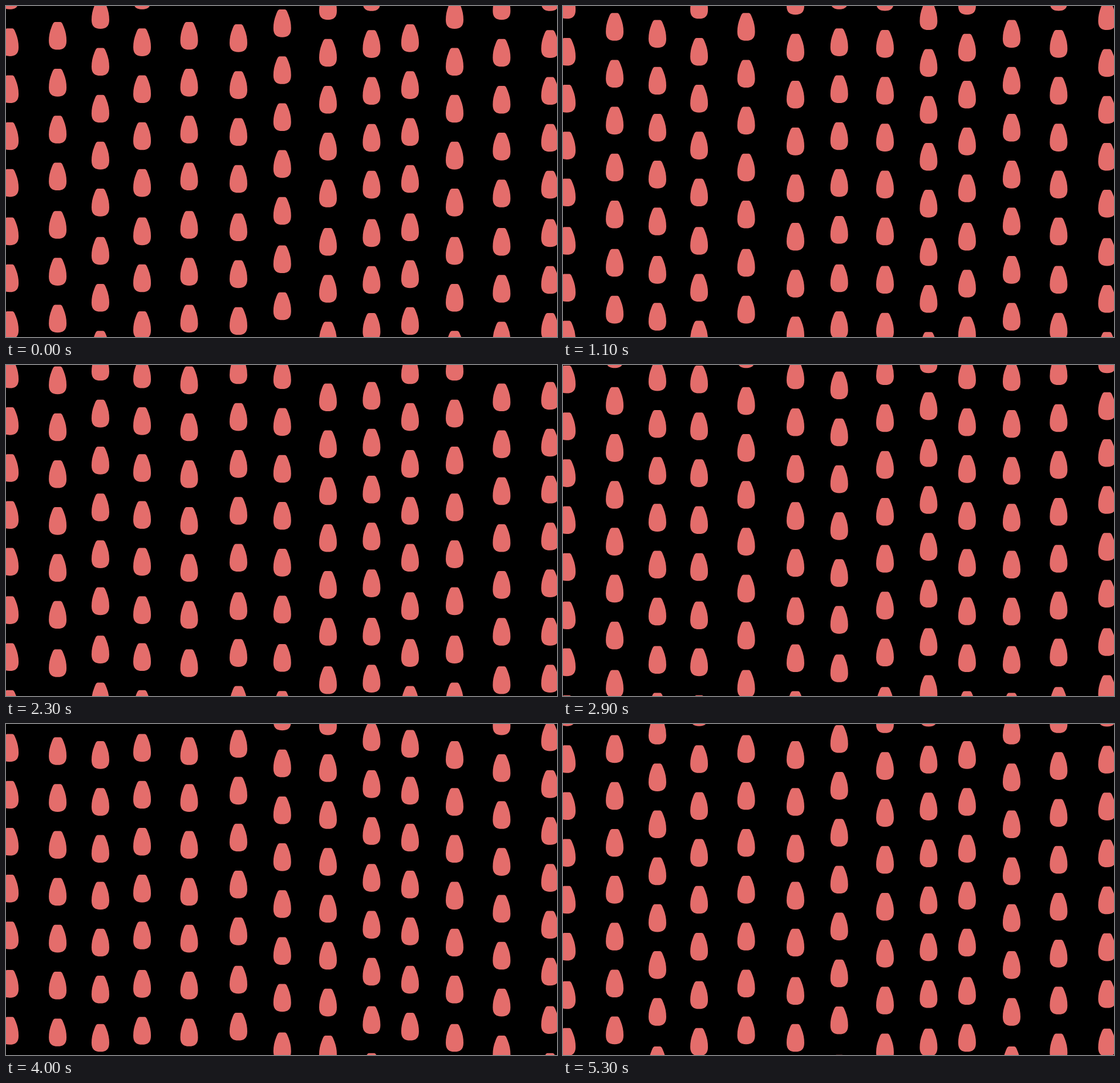
These frames come from a looping animation (966 px wide and 580 px high, 5.4 s). An HTML page with a canvas:

```html
<!DOCTYPE html>
<html lang="en">
<head>
<meta charset="utf-8">
<title>Falling drops</title>
<style>
  html, body { margin: 0; height: 100%; overflow: hidden; background: #000; }
  canvas { display: block; }
</style>
</head>
<body>
<canvas id="stage" width="966" height="580"></canvas>
<script>
const LOOP = 5400, STEP = 100;
const SPACING = 82.17, SEAM = 2.6; // each strip has one slightly wider gap
const SLOW = 1.511, MEDIUM = 2 * SLOW, FAST = 4 * SLOW; // px per step

// Strips share a speed and the height of their seam; each hangs at a few x.
const strips = [
  { speed: SLOW, seam: 370.6, at: [6.6, 238.6] },
  { speed: SLOW, seam: 363.4, at: [407.5, 708.4] },
  { speed: MEDIUM, seam: 404.8, at: [165.5, 786.5] },
  { speed: MEDIUM, seam: 419.5, at: [484.3] },
  { speed: MEDIUM, seam: 373.6, at: [640.9, 953.8] },
  { speed: FAST, seam: 359.2, at: [90.6, 321.1] },
  { speed: FAST, seam: 389, at: [564.5, 868.9] }
];

const drop = new Path2D(
  'M-4.5 0H4.5C7.5 0 8.6 3.5 10.8 9Q15.5 20.5 15.5 33' +
  'C15.5 44.5 10 48.6 0 48.6S-15.5 44.5 -15.5 33' +
  'Q-15.5 20.5 -10.8 9C-8.6 3.5 -7.5 0 -4.5 0Z');

const ctx = document.getElementById('stage').getContext('2d');

function drawStrip(x, seam) {
  for (let i = -10; i < 5; i++) {
    const y = seam + i * SPACING - (i < 0 ? SEAM : 0);
    ctx.setTransform(1, 0, 0, 1, x, y);
    ctx.fill(drop);
  }
}

function tick() {
  const step = Math.floor(performance.now() % LOOP / STEP);
  ctx.resetTransform();
  ctx.clearRect(0, 0, 966, 580);
  ctx.fillStyle = '#e46d6b';
  for (const { speed, seam, at } of strips)
    for (const x of at) drawStrip(x, seam + step * speed);
  requestAnimationFrame(tick);
}
tick();
</script>
</body>
</html>
```
